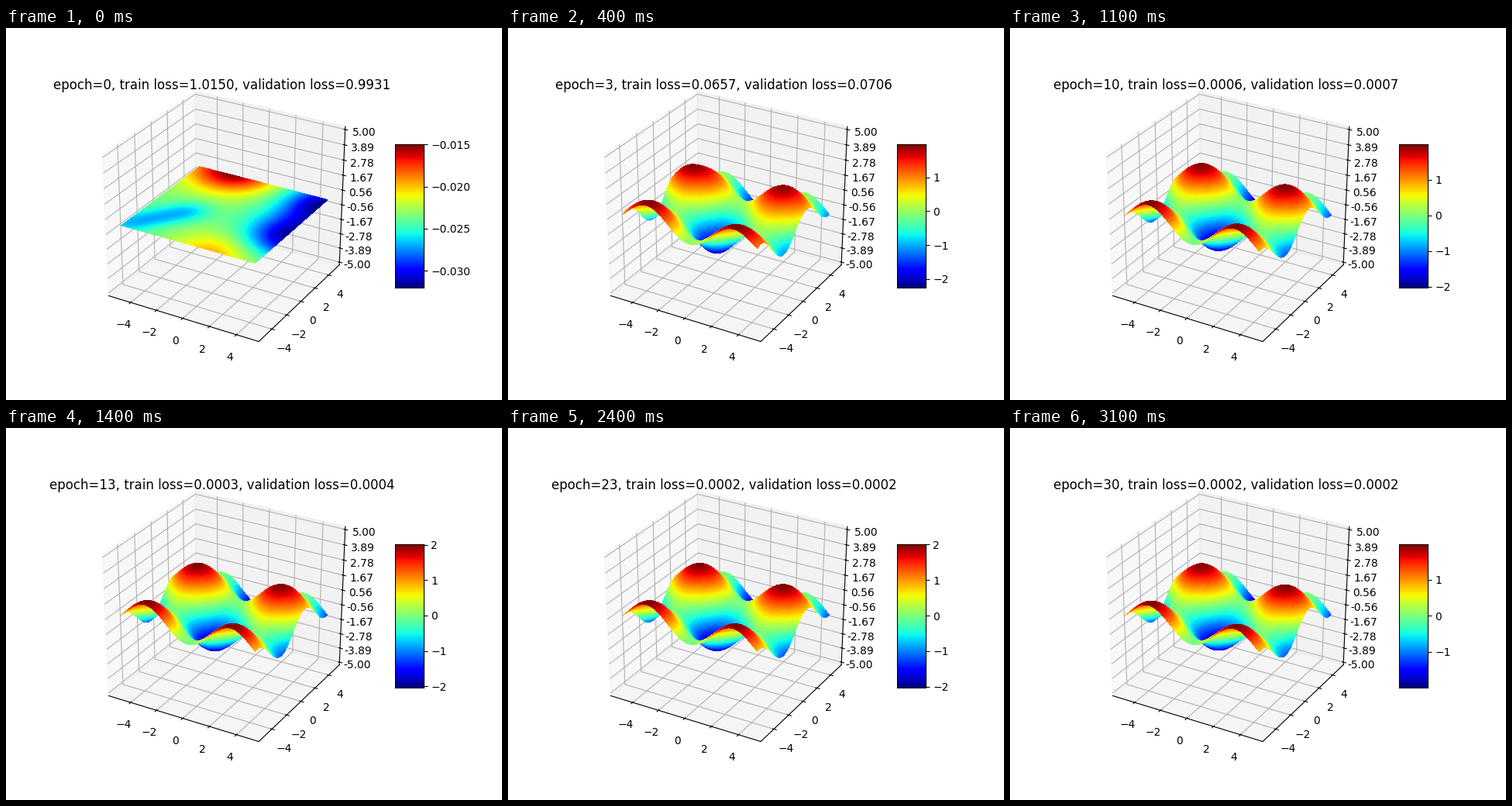
Recreate the animation shown at these times as a matplotlib script. Size 640 by 480 pixels, loop 3.2 s.

```python
import numpy as np
import matplotlib.pyplot as plt
from matplotlib.animation import FuncAnimation
from matplotlib.collections import LineCollection, PolyCollection
from matplotlib.patches import Polygon

plt.rcParams["text.kerning_factor"] = 6

W, H = 640, 480
FRAMES, INTERVAL = 32, 100
LEFT, BOTTOM, AX_W, AX_H = 80, 427.2, 396.8, 369.6

# sampled domain, with 5 % margins in x and y
axis = np.arange(100) / 10 - 5
X, Y = np.meshgrid(axis, axis)
SPAN = axis[-1] - axis[0]
MID = (axis[-1] + axis[0]) / 2
CENTER = np.array([MID, MID, 0])
SIZE = np.array([1.1 * SPAN, 1.1 * SPAN, 10])
DELTA = SIZE / 12
EDGE = SIZE / 2 + DELTA / 4            # the panes reach past the limits


def project(points):
    """Perspective view at elevation 30, azimuth -60: pixels and distance."""
    x, y, z = np.moveaxis((np.asarray(points, float) - CENTER) / SIZE, -1, 0)
    elev, azim = np.radians(30), np.radians(-60)
    ce, se, ca, sa = np.cos(elev), np.sin(elev), np.cos(azim), np.sin(azim)
    dist = 10 - (ce * ca * x + ce * sa * y + se * z)
    u = (-sa * x + ca * y) / dist
    v = (-se * ca * x - se * sa * y + ce * z) / dist
    px = LEFT + AX_W * (u + 0.095) / 0.185
    py = BOTTOM - AX_H * (v + 0.095) / 0.185
    return np.stack([px, py], -1), dist


# ---- surfaces -------------------------------------------------------------

def bump(x, y, height, width):
    return height * np.exp(-((X - x) ** 2 + (Y - y) ** 2) / width ** 2)


def untrained():
    """Nearly flat sheet: two hills, a basin on the right, a groove on the left."""
    z = (bump(-2.5, 5.5, 0.55, 3.2) + bump(2, -5.5, 0.25, 2.8)
         + bump(5.3, 4, -0.50, 2.9) + bump(5.3, -1, -0.48, 2.9))
    for t in np.linspace(0, 1, 4):
        z += bump(-5 + 3 * t, -4.8 + 3.8 * t, -0.14, 1.4)
    return -0.03205 + 0.01715 * (z - z.min()) / np.ptp(z)


START = untrained()
GOAL = np.sin(Y) - np.cos(X)
# what the fit still gets wrong after three epochs
ERROR = (bump(-4.3, 0.9, 0.40, 1.1) + bump(-3, 2, -0.20, 1.0)
         + bump(-5, -3.5, 0.40, 1.4) + bump(5.4, -4, 0.45, 1.5)
         + bump(0, -1.6, -0.32, 1.2))


def decay(epoch, epochs, values):
    """Exponential decay between key epochs."""
    return np.exp(np.interp(epoch, epochs, np.log(values)))


def train_loss(epoch):
    return decay(epoch, [0, 3, 7, 13, 30],
                 [1.015, 0.0657, 0.0013, 0.0003, 0.00016])


def valid_loss(epoch):
    return decay(epoch, [0, 3, 7, 13, 30],
                 [0.9931, 0.0706, 0.0013, 0.00036, 0.00016])


def surface(epoch):
    mix = min(1, epoch / 3)
    rest = np.sqrt(train_loss(max(epoch, 3)) / train_loss(3))
    gain = np.interp(epoch, [3, 13, 23, 30], [0.97, 1.01, 1.005, 0.99])
    return mix * (gain * GOAL + rest * ERROR) + (1 - mix) * START


def corners(a):
    """The four corners of every grid cell."""
    return np.stack([a[:-1, :-1], a[:-1, 1:], a[1:, 1:], a[1:, :-1]], 2)


def facets(z):
    """Cells as pixel quads with their mean heights, farthest first."""
    xy, dist = project(np.stack([X, Y, z], -1))
    order = np.argsort(-corners(dist).mean(2).ravel(), kind="stable")
    quads = corners(xy).reshape(-1, 4, 2)
    heights = corners(z).mean(2).ravel()
    return quads[order], heights[order]


# ---- fixed scene ----------------------------------------------------------

fig = plt.figure(figsize=(W / 100, H / 100), dpi=100, facecolor="white")
ax = fig.add_axes([0, 0, 1, 1])
ax.set_xlim(0, W)
ax.set_ylim(H, 0)
ax.axis("off")

BACK = CENTER + EDGE * (-1, 1, -1)     # corner shared by the three panes
FRONT = CENTER - EDGE * (-1, 1, -1)


def moved(point, *axes):
    """The point with the given coordinates taken to the front."""
    point = point.copy()
    for k in axes:
        point[k] = FRONT[k]
    return point


def add_lines(lines, color, zorder, cap):
    ax.add_collection(LineCollection(lines, colors=color, linewidths=0.8,
                                     capstyle=cap, zorder=zorder),
                      autolim=False)


def draw_pane(index, grey):
    a, b = [k for k in range(3) if k != index]
    outline = [BACK, moved(BACK, a), moved(BACK, a, b), moved(BACK, b)]
    ax.add_patch(Polygon(project(outline)[0], color=(grey,) * 3, alpha=0.5,
                         linewidth=1, zorder=1))


def draw_axis(index, side, edge_sign, ticks, form):
    """Axis line, grid, tick marks along `side`, and labels."""
    sign = np.array(edge_sign)
    edge = CENTER + sign * EDGE
    a, b = [k for k in range(3) if k != index]
    grid, marks = [], []
    for value in ticks:
        base = BACK.copy()
        base[index] = value
        grid.append(project([moved(base, a), base, moved(base, b)])[0])

        pos = edge.copy()
        pos[index] = value
        step = np.zeros(3)
        step[side] = sign[side] * DELTA[side]
        marks.append(project([pos + 0.2 * step, pos - 0.1 * step])[0])

        (lx, ly), _ = project(pos + sign * DELTA)
        ax.text(lx, ly, form(value), ha="center", va="top", fontsize=10,
                zorder=3)

    line = np.array([edge, edge])
    line[:, index] = BACK[index], FRONT[index]
    add_lines(grid, "#b0b0b0", 2, "butt")
    add_lines([project(line)[0]] + marks, "black", 3, "projecting")


def whole(value):
    return f"{value}".replace("-", "\u2212")


for index, grey in enumerate((0.95, 0.90, 0.925)):
    draw_pane(index, grey)
draw_axis(0, 1, (0, -1, -1), range(-4, 5, 2), whole)
draw_axis(1, 0, (1, 0, -1), range(-4, 5, 2), whole)
draw_axis(2, 0, (1, 1, 0), np.linspace(-5, 5, 10), "{:.2f}".format)

sheet = PolyCollection([], cmap="jet", linewidths=0, edgecolors="none",
                       antialiaseds=False, zorder=4)
ax.add_collection(sheet, autolim=False)
title = ax.text(LEFT + AX_W / 2, 78.84, "", ha="center", va="baseline",
                fontsize=12, zorder=5)

bar_ax = fig.add_axes([501.6 / W, 145.2 / H, 36.96 / W, 184.8 / H])
bar = bar_ax.imshow(np.arange(256)[:, None], cmap="jet", aspect="auto",
                    origin="lower", interpolation="nearest")
bar_ax.set_xticks([])
bar_ax.yaxis.tick_right()


# ---- animation ------------------------------------------------------------

def update(frame):
    epoch = max(0, frame - 1)
    quads, heights = facets(surface(epoch))
    low, high = heights.min(), heights.max()
    sheet.set_verts(quads)
    sheet.set_array(heights)
    sheet.set_clim(low, high)
    bar.set_extent((0, 1, low, high))
    bar_ax.set_xlim(0, 1)
    bar_ax.set_ylim(low, high)
    title.set_text(f"epoch={epoch}, train loss={train_loss(epoch):.4f}, "
                   f"validation loss={valid_loss(epoch):.4f}")
    return sheet, bar, title


anim = FuncAnimation(fig, update, frames=FRAMES, interval=INTERVAL,
                     repeat=True, repeat_delay=0, blit=False)
plt.show()
```
